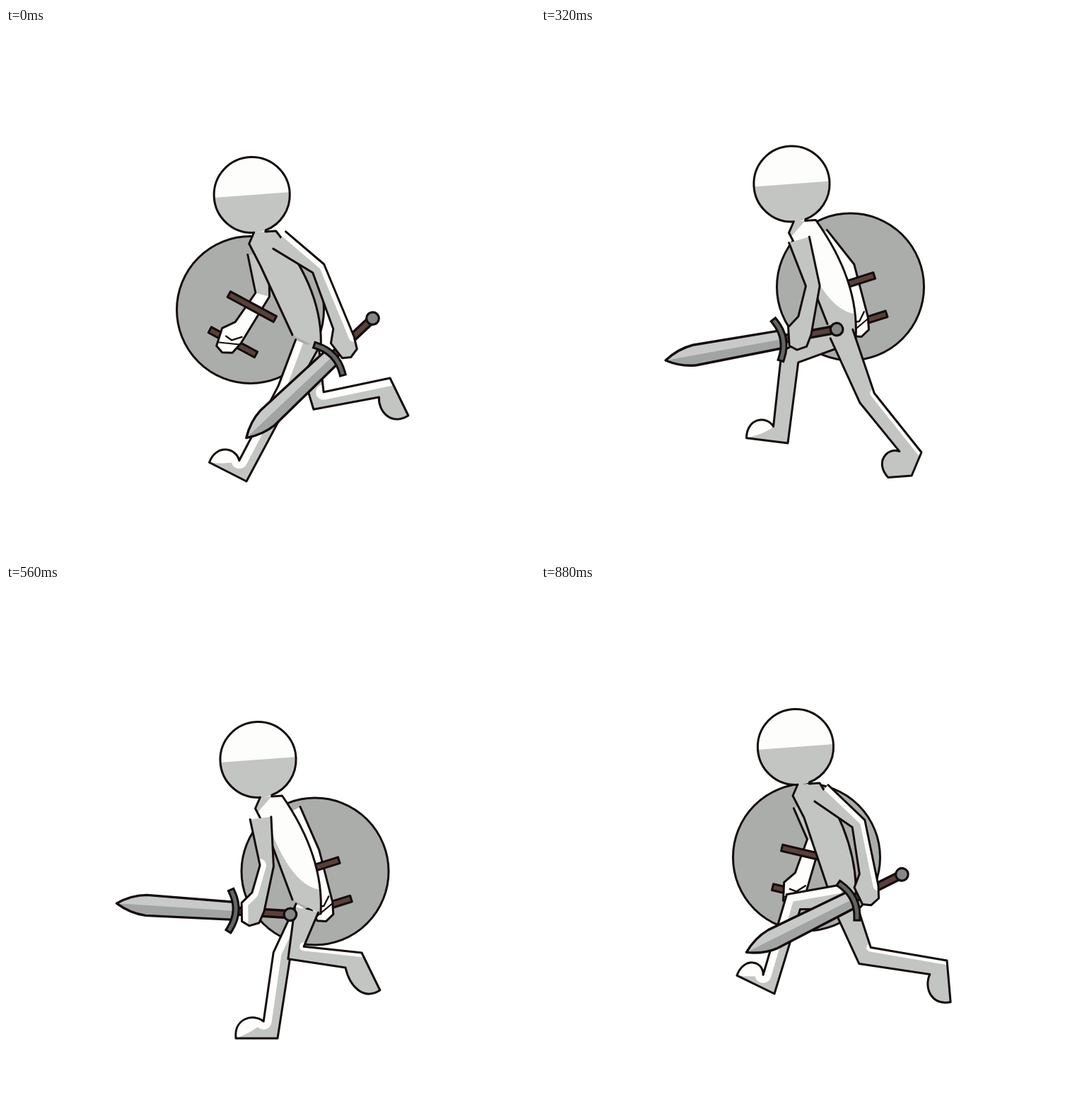
An HTML page with a canvas that plays this animation: 748 by 748 pixels, repeating every 960 ms.

```html
<!DOCTYPE html>
<html lang="en">
<head>
<meta charset="utf-8">
<title>Run cycle</title>
<style>
html, body { margin: 0; width: 100%; height: 100%; overflow: hidden; background: #fff; }
canvas { display: block; width: 100vw; height: 100vh; }
</style>
</head>
<body>
<canvas id="stage" width="748" height="748"></canvas>
<script>
const ctx = document.getElementById('stage').getContext('2d');
const STEP_MS = 80, STEPS = 12;
const INK = '#140c0c', GREY = '#c3c5c3', LIT = '#fdfdfb', SHIELD = '#abadab', BROWN = '#5a403b';

// Height of the head through one stride; everything above the knees follows it.
const BOB = [236, 247, 251, 241, 220.5, 229];

// Upper-body keys by step: head x; shield x, drop below head; fist x, drop; sword angle.
const BODY = {
  0: [347.7, 345.5, 162.5, 480, 211, 136.6],
  2: [353.5, 382.5, 169.5, 422, 224, 156.6],
  4: [354.5, 437.5, 145.5, 366, 215, 169.7],
  6: [358.5, 458.5, 158.5, 317, 209, 192.7],
  8: [354.5, 415.5, 157.5, 381, 222, 174.6],
  9: [352.5, 386, 166, 411, 220, 161.5],
  11: [360, 375.5, 156, 463, 204, 153.4]
};

// One leg through the run: knee, heel, foot angle. The other leg is half a cycle away.
const LEG = [
  [396, 511, 340, 641, -27], [390, 523, 384, 641, 0], [391, 529, 430, 641, 0],
  [424, 543, 491, 614, 30], [461, 523, 538, 600, 37], [458, 524, 574, 531, 95],
  [442, 527, 543, 495, 116], [410, 520, 503, 520, 116], [374, 506, 479, 541, 82],
  [356, 494, 392, 591, 29], [352, 465, 349, 587, -7], [357, 448, 330, 578, -26]
];

function bodyAt(step) {
  if (BODY[step]) return BODY[step];
  const next = BODY[(step + 1) % STEPS];
  return BODY[step - 1].map((v, i) => (v + next[i]) / 2);
}

const radians = degrees => degrees * Math.PI / 180;
const polar = degrees => [Math.cos(radians(degrees)), Math.sin(radians(degrees))];
const add = ([x, y], dx, dy) => [x + dx, y + dy];

function direction([ax, ay], [bx, by]) {
  const length = Math.hypot(bx - ax, by - ay);
  return [(bx - ax) / length, (by - ay) / length];
}

// Local axes: a runs along u, b to the side that is the back of a hanging limb.
const axes = ([x, y], [ux, uy]) => (a, b) => [x + a * ux + b * uy, y + a * uy - b * ux];

// Back and front corners of a bent joint.
function joint(p, u, v, half) {
  const sum = [u[0] + v[0], u[1] + v[1]];
  const mid = direction([0, 0], sum);
  const reach = half / Math.max(0.85, mid[0] * u[0] + mid[1] * u[1]);
  const at = axes(p, mid);
  return [at(0, reach), at(0, -reach)];
}

function poly(points, path = new Path2D()) {
  points.forEach((p, i) => path[i ? 'lineTo' : 'moveTo'](...p));
  return path;
}

function circle([x, y], r) {
  const path = new Path2D();
  path.arc(x, y, r, 0, 2 * Math.PI);
  return path;
}

function fill(path, color) {
  ctx.fillStyle = color;
  ctx.fill(path);
}

function stroke(path, width = 3, color = INK) {
  ctx.lineWidth = width;
  ctx.strokeStyle = color;
  ctx.stroke(path);
}

// Fills a shape, paints its light inside it, then inks the outline.
function part(shape, color, light, width) {
  fill(shape, color);
  ctx.save();
  ctx.clip(shape);
  light();
  ctx.restore();
  stroke(shape, width);
}

const rim = (width, ...points) => stroke(poly(points), width, LIT);

function drawHead([x, y]) {
  fill(circle([x, y], 53.6), LIT);
  ctx.save();
  ctx.clip(circle([x, y], 53.6));
  fill(poly([[x - 55, y + 4], [x + 55, y - 4], [x + 55, y + 55], [x - 55, y + 55]]), GREY);
  ctx.restore();
  const outline = new Path2D();
  outline.arc(x, y, 53.6, 1.53, 1.2 + 2 * Math.PI);
  stroke(outline);
}

function drawStrap(at, side) {
  const strap = poly([at(-37, side - 4.5), at(37, side - 4.5), at(37, side + 4.5), at(-37, side + 4.5)]);
  strap.closePath();
  fill(strap, BROWN);
  stroke(strap);
}

function drawLeg(hip, step) {
  const [kneeX, kneeY, heelX, heelY, angle] = LEG[step];
  const knee = [kneeX, kneeY], heel = [heelX, heelY];
  const thigh = direction(hip, knee), shin = direction(knee, heel);
  const top = axes(hip, thigh), end = axes(heel, shin);
  const [, sin] = polar(angle), [cos] = polar(angle);
  const foot = axes(heel, [-cos, sin]);
  const [kneeBack, kneeFront] = joint(knee, thigh, shin, 12);
  const ankle = end(-23, -21), toe = foot(59, 0);
  const dome = path => path.bezierCurveTo(...foot(35, -36), ...foot(62, -28), ...toe);
  const pushing = step === 3 || step === 4;

  const shape = poly([top(0, -17), kneeFront, ankle]);
  dome(shape);
  if (pushing) shape.lineTo(...foot(31, 18));
  [heel, kneeBack, top(0, 17)].forEach(p => shape.lineTo(...p));

  part(shape, GREY, () => {
    if (step < 2 || step === 11) rim(23, top(0, -17), kneeFront, ankle);
    if (step > 2 && step < 9) rim(step === 6 ? 22 : 12, heel, kneeBack);
    if (step < 3 || step > 9) {
      const instep = poly([ankle]);
      dome(instep);
      instep.quadraticCurveTo(...foot(32, -10), ...ankle);
      fill(instep, LIT);
    }
  });
}

function drawTorso(head, hip, swing) {
  const shoulder = add(head, 34, 51), neck = add(head, 19, 52);
  const armpit = add(head, 12, 100), hipRight = add(hip, 20, 6);
  const back = add(hip, 25, -75);
  const shape = poly([add(head, 3, 53), add(head, -4, 69), armpit, add(hip, -20, -14)]);
  poly([neck, shoulder], shape);
  shape.quadraticCurveTo(...back, ...hipRight);

  const body = poly([add(head, 3, 53), add(head, -4, 69), armpit, add(hip, -20, -14), hipRight]);
  body.quadraticCurveTo(...back, ...shoulder);
  body.lineTo(...neck);
  fill(body, GREY);
  ctx.save();
  ctx.clip(body);
  if (swing < -0.1) {
    const light = poly([add(head, -2, 76), neck, shoulder]);
    light.quadraticCurveTo(...back, ...add(hip, 22, -28));
    light.quadraticCurveTo(...add(hip, -18, -30), ...add(armpit, 6, 0));
    fill(light, LIT);
  } else if (swing < 0.8) {
    const edge = poly([neck, shoulder]);
    edge.quadraticCurveTo(...back, ...hipRight);
    stroke(edge, 18, LIT);
  }
  ctx.restore();
  stroke(shape);
}

function drawArm(shoulder, elbow, fist, light) {
  const upper = direction(shoulder, elbow), lower = direction(elbow, fist);
  const top = axes(shoulder, upper), hand = axes(fist, lower);
  const [back, front] = joint(elbow, upper, lower, 9.5);
  const knuckles = [hand(-6, 15), hand(12, 13), hand(20, 1), hand(17, -11), hand(-8, -19), hand(-26, -9)];
  const shape = poly([top(0, 15), back, ...knuckles, front, top(0, -15)]);
  part(shape, GREY, () => light({ shape, top, hand, back, front, knuckles }));
  return hand;
}

function drawSword([x, y], degrees) {
  ctx.save();
  ctx.translate(x, y);
  ctx.rotate(radians(degrees));
  const blade = poly([[25, 12.5], [25, -12.5], [151, -14.5]]);
  blade.quadraticCurveTo(173, -13, 193, 0);
  blade.quadraticCurveTo(173, 13, 151, 14.5);
  blade.closePath();
  part(blade, '#c7cac8', () => fill(poly([[20, -20], [187, -20], [187, 0], [20, 0]]), '#a2a4a3'), 3.4);
  const grip = poly([[-48, -5], [22, -5], [22, 5], [-48, 5]]);
  fill(grip, BROWN);
  stroke(grip, 3.4);
  const guard = poly([[31, -26]]);
  guard.quadraticCurveTo(17, 0, 31, 26);
  ctx.lineCap = 'square';
  stroke(guard, 11);
  stroke(guard, 5, '#626765');
  ctx.lineCap = 'round';
  fill(circle([-53, 0], 8.8), '#858887');
  stroke(circle([-53, 0], 8.8), 3.2);
  ctx.restore();
}

function draw(step) {
  const [headX, shieldX, shieldDrop, fistX, fistDrop, swordAngle] = bodyAt(step);
  const swing = Math.cos(2 * Math.PI * step / STEPS);
  const head = [headX, BOB[step % BOB.length]];
  const hip = [425, head[1] + 212];
  const fist = [fistX, head[1] + fistDrop];
  const center = [shieldX, head[1] + shieldDrop];
  const shield = axes(center, polar((402 - shieldX) / 2));

  ctx.fillStyle = '#fff';
  ctx.fillRect(0, 0, 748, 748);
  ctx.lineCap = ctx.lineJoin = 'round';

  fill(circle(center, 104), SHIELD);
  stroke(circle(center, 104));
  drawStrap(shield, -52);
  const farShoulder = add(head, 29 - 20 * swing, 78 + 5 * swing);
  const hand = drawArm(farShoulder, shield(5, 27), shield(-5, -52), arm => {
    fill(swing < -0.1 ? arm.shape : poly([arm.back, ...arm.knuckles, arm.front]), LIT);
  });
  stroke(poly([hand(-2, -8), hand(-2, 2), hand(-14, 11)]), 2.4);
  stroke(poly([hand(11, -11), hand(-3, 14)]), 2);
  drawStrap(shield, 5);

  drawLeg(hip, (step + STEPS / 2) % STEPS);
  drawHead(head);
  drawTorso(head, hip, swing);
  drawLeg(hip, step);
  drawSword(fist, swordAngle);

  const shoulder = add(head, 20 + 19 * swing, 74 - 10 * swing);
  const elbow = axes(shoulder, polar(90 - (29 + 25 * swing)))(68, 0);
  drawArm(shoulder, elbow, fist, arm => {
    if (swing > -0.1) rim(17, arm.top(0, 15), arm.back);
    if (swing > 0.6) rim(15, arm.back, arm.knuckles[0]);
    if (swing < -0.6) rim(18, arm.front, ...arm.knuckles.slice(3).reverse());
  });
}

function frame(now) {
  draw(Math.floor(now / STEP_MS) % STEPS);
  requestAnimationFrame(frame);
}
draw(0);
requestAnimationFrame(frame);
</script>
</body>
</html>
```
